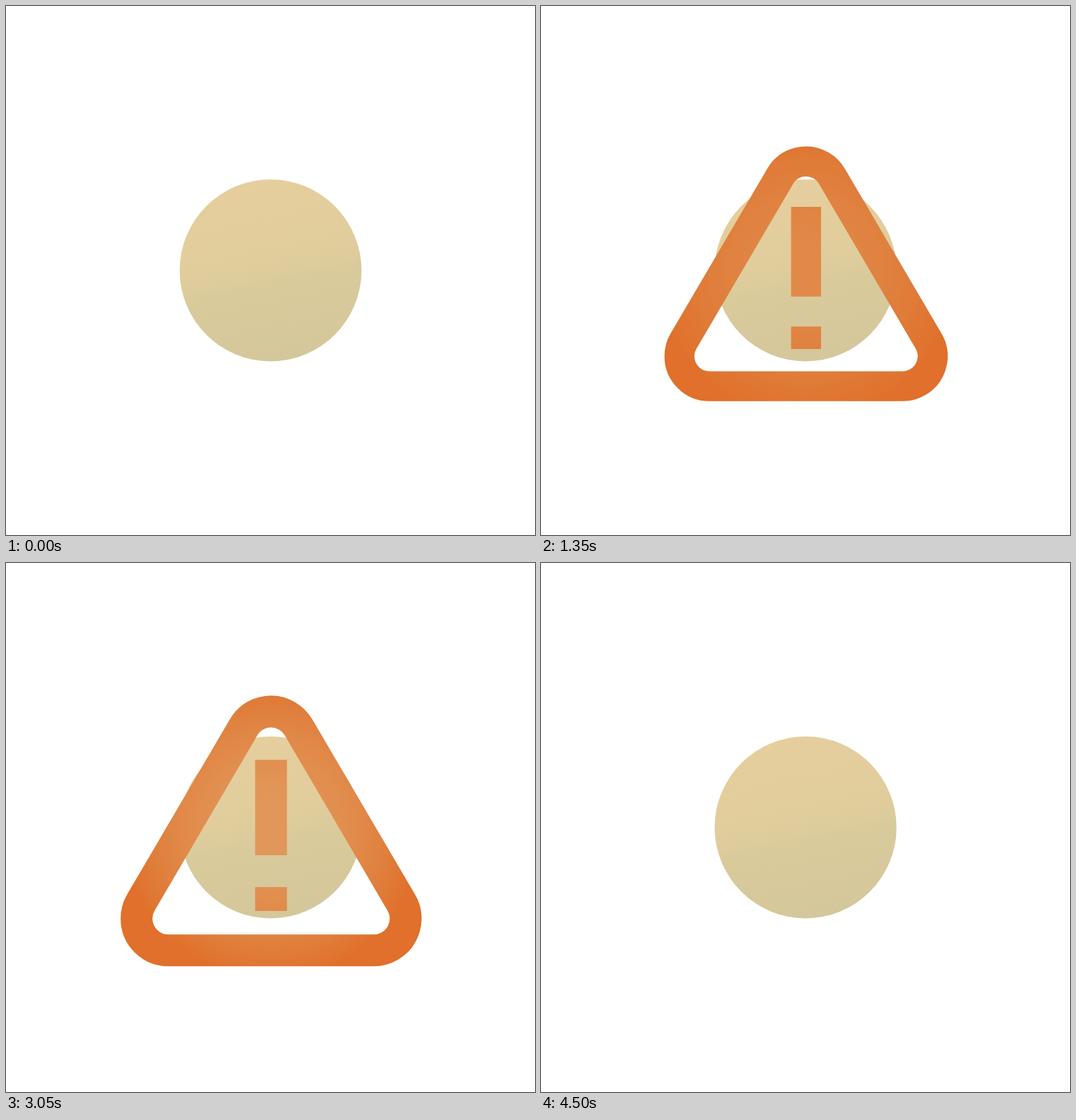
Write an HTML page with a canvas that moves like this. It is 748x748 px and loops after 5 s.

```html
<!DOCTYPE html>
<html lang="en">
<head>
<meta charset="utf-8">
<title>Warning pulse</title>
<style>
html, body { margin: 0; width: 100%; height: 100%; overflow: hidden; background: #fff; }
canvas { display: block; }
</style>
</head>
<body>
<canvas id="stage" width="748" height="748"></canvas>
<script>
const ctx = document.getElementById('stage').getContext('2d');
const LOOP = 5000, STEP = 50, END = 4500;
const ORANGE = [224, 112, 43], CREAM = [226, 206, 155];

const mix = (a, b, k) => a + (b - a) * k;

// Each pulse shrinks towards its rest size while it fades in
const PULSE = 450, LEAD = 150;

function poseAt(t) {
  const phase = LEAD + (t - LEAD) % PULSE;
  const swell = Math.exp(-.00347 * phase);
  return { unit: 18 + 15.2 * swell, alpha: 1 - 1.9 * swell ** 1.25 };
}

// Strength of the glow behind the icon, by distance from the centre
const GLOW_TOP = 1.25, GLOW_FALL = .00586, GLOW_END = GLOW_TOP / GLOW_FALL;
const glow = r => Math.min(1, GLOW_TOP - GLOW_FALL * r);

function tint(alpha, unit) {
  const paint = ctx.createRadialGradient(0, 0, 0, 0, 0, GLOW_END / unit);
  for (let k = 0; k <= 1; k += 1 / 16) {
    const share = alpha / (alpha + (1 - alpha) * glow(GLOW_END * k));
    const rgb = CREAM.map((c, i) => Math.round(mix(c, ORANGE[i], share)));
    paint.addColorStop(k, `rgb(${rgb})`);
  }
  return paint;
}

function drawDisc() {
  const paint = ctx.createLinearGradient(347, 248, 401, 500);
  paint.addColorStop(0, 'rgb(230,206,157)');
  paint.addColorStop(.42, 'rgb(225,205,156)');
  paint.addColorStop(.6, 'rgb(217,202,155)');
  paint.addColorStop(1, 'rgb(212,199,155)');
  ctx.fillStyle = paint;
  ctx.beginPath();
  ctx.arc(374.1, 373.9, 128.6, 0, Math.PI * 2);
  ctx.fill();
}

const HALF = 6.45, TOP = -5.28, BASE = 5.72;
const NORMAL = Math.atan2(BASE - TOP, HALF) - Math.PI / 2;

function drawIcon({ unit, alpha }) {
  ctx.save();
  // A faint icon shows only where the glow lifts it above half strength
  if (alpha < .5) {
    const edge = (GLOW_TOP - (.5 - alpha) / (1 - alpha)) / GLOW_FALL;
    ctx.beginPath();
    ctx.arc(374.4, 374, edge, 0, Math.PI * 2);
    ctx.clip();
  }
  ctx.translate(374.8, 374);
  ctx.scale(unit, unit);

  ctx.strokeStyle = ctx.fillStyle = tint(alpha, unit);
  ctx.lineWidth = 2;
  ctx.beginPath();
  ctx.arc(0, TOP, 2, Math.PI - NORMAL, Math.PI * 2 + NORMAL);
  ctx.arc(HALF, BASE, 2, NORMAL, Math.PI / 2);
  ctx.arc(-HALF, BASE, 2, Math.PI / 2, Math.PI - NORMAL);
  ctx.closePath();
  ctx.stroke();

  ctx.fillRect(-1, -4.25, 2, 5.99);
  ctx.fillRect(-1, 3.74, 2, 1.5);
  ctx.restore();
}

const start = performance.now();

function draw() {
  const elapsed = Math.max(0, performance.now() - start) % LOOP;
  const t = Math.floor(elapsed / STEP) * STEP;
  const pose = poseAt(t);
  ctx.clearRect(0, 0, 748, 748);
  drawDisc();
  if (t > 0 && t < END && pose.alpha > 0) drawIcon(pose);
  requestAnimationFrame(draw);
}
draw();
</script>
</body>
</html>
```
